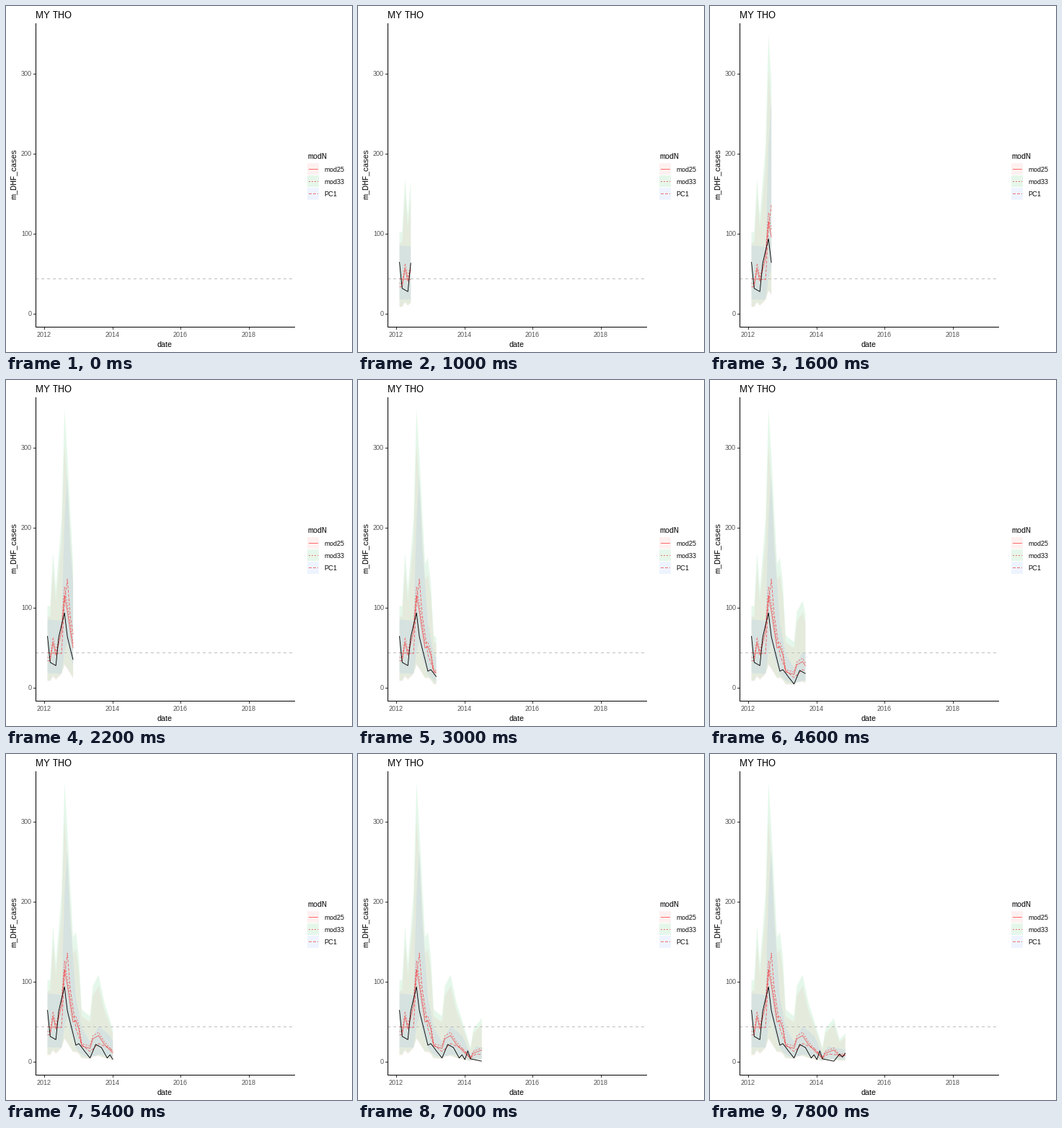
Recreate the animation shown at these times as a matplotlib script. Size 480x480 px, loop 8 s.

```python
import numpy as np
import matplotlib.pyplot as plt
from matplotlib.animation import FuncAnimation
from matplotlib.patches import Polygon, Rectangle

plt.rcParams.update({"font.family": "Liberation Sans", "lines.scale_dashes": False,
                     "text.hinting": "default", "text.hinting_factor": 1})

SIZE, FRAMES, STEP_MS = 480, 40, 200
LEFT, RIGHT, TOP, BOTTOM = 41, 401, 24, 445
RED_ALPHA, FILL_ALPHA = 0.55, 0.1
FILLS = ["#F8766D", "#00BA38", "#619CFF"]
DASHES = ["-", (0, (2, 2)), (0, (4, 2))]
NAMES = ["mod25", "mod33", "PC1"]
START = np.datetime64("2012-01-01")

dates = np.arange("2012-02", "2014-12", dtype="datetime64[M]").astype("datetime64[D]")
days = (dates - START).astype(float)
months = np.arange(len(days))
# each month lands on a whole frame of the 100-frame reveal
keys = np.round(99 * (days - days[0]) / 2526)


def through(*points):
    """Monthly series running straight between (month, value) points."""
    return np.interp(months, *zip(*points))


cases = through((0, 65), (1, 32), (3, 28), (4, 64), (6, 94), (7, 64), (10, 21),
                (11, 23), (15, 5), (17, 22), (19, 18), (21, 5), (22, 9), (23, 3),
                (24, 14), (25, 4), (29, 1), (31, 10), (32, 6), (33, 11))
mod25 = through((0, 34), (1, 34), (2, 57), (3, 41), (5, 70), (6, 116), (7, 96),
                (9, 50), (10, 52), (11, 42), (12, 20), (15, 17), (16, 29), (18, 33),
                (20, 22), (25, 4), (26, 11), (29, 15), (31, 7), (33, 9))
pc1 = through((0, 44), (5, 43), (6, 107), (7, 136), (8, 92), (10, 42), (12, 22),
              (15, 13), (18, 23), (22, 17), (25, 5), (27, 10), (33, 8))
mod33 = 1.08 * mod25 + 1.5
lines = [mod25, mod33, pc1]

# ribbons keep a nearly fixed ratio to their fitted line
top33 = (2.67 + 0.015 * months) * mod33
top25 = 0.87 * top33
bands = [(0.65 * mod25 ** 2 / top25, top25),
         (0.65 * mod33 ** 2 / top33, top33),
         (0.42 * pc1, 1.95 * pc1)]


def px(day):
    return 53.5 + 0.1297 * np.asarray(day)


def py(value):
    return 427.3 - 1.11 * np.asarray(value)


fig = plt.figure(figsize=(SIZE / 72, SIZE / 72), dpi=72, facecolor="white")
ax = fig.add_axes([0, 0, 1, 1])
ax.set_xlim(0, SIZE)
ax.set_ylim(SIZE, 0)
ax.axis("off")


def stroke(x, y, color="black", ls="-", alpha=1, lw=1, z=3):
    line, = ax.plot(x, y, color=color, ls=ls, lw=lw, alpha=alpha, zorder=z,
                    snap=False, dash_capstyle="butt", solid_capstyle="butt",
                    solid_joinstyle="round")
    return line


def label(x, y, text, size, color="black", ha="left"):
    ax.text(x, y, text, fontsize=size, color=color, ha=ha, va="baseline")


# axes
stroke([LEFT + 0.5] * 2, [TOP, BOTTOM + 1])
stroke([LEFT, RIGHT], [BOTTOM + 0.5] * 2)
for v in range(0, 301, 100):
    y = np.floor(py(v)) + 0.5
    stroke([LEFT - 3, LEFT], [y, y], "#333333")
    label(36, y + 2.5, str(v), 9, "#4D4D4D", "right")
for year in range(2012, 2019, 2):
    day = (np.datetime64(f"{year}-01-01") - START).astype(int)
    x = np.floor(px(day)) + 0.5
    stroke([x, x], [BOTTOM + 1, BOTTOM + 4], "#333333")
    label(x - 0.5, 459, str(year), 9, "#4D4D4D", "center")
label(41, 17, "MY THO", 13)
label(220.5, 473, "date", 11, ha="center")
ax.text(16, 232.5, "m_DHF_cases", fontsize=11, rotation=90, ha="right", va="center")
stroke([LEFT, RIGHT], [378.5] * 2, "#BEBEBE", (0, (4, 4)), z=2)

# legend
label(418, 212, "modN", 11)
for k, name in enumerate(NAMES):
    y = 217.5 + 17.28 * k
    ax.add_patch(Rectangle((417.6, y), 16.6, 16.6, fc=FILLS[k], ec="none",
                           alpha=FILL_ALPHA))
    mid = np.floor(y + 8.8) + 0.5
    stroke([420, 433], [mid, mid], "red", DASHES[k], RED_ALPHA)
    label(441, mid + 3.5, name, 9)

# moving parts
ribbons = [ax.add_patch(Polygon([[0, 0]] * 3, fc=c, ec="none", alpha=FILL_ALPHA,
                                zorder=1)) for c in FILLS]
fits = [stroke([], [], "red", d, RED_ALPHA, lw=0.9) for d in DASHES]
truth = stroke([], [], lw=0.9, z=4)


def shown(values, frame):
    """Values up to this frame, with an interpolated head."""
    return np.append(values[keys < frame], np.interp(frame, keys, values))


def draw(frame):
    x = px(shown(days, frame))
    for ribbon, (low, high) in zip(ribbons, bands):
        up, down = py(shown(high, frame)), py(shown(low, frame))
        ribbon.set_xy(np.column_stack([np.r_[x, x[::-1]], np.r_[up, down[::-1]]]))
    for curve, values in zip([*fits, truth], [*lines, cases]):
        curve.set_data(x, py(shown(values, frame)))
    parts = [*ribbons, *fits, truth]
    for part in parts:
        part.set_visible(frame > 0)
    return parts


anim = FuncAnimation(fig, draw, frames=FRAMES, interval=STEP_MS, repeat=True,
                     repeat_delay=0, blit=False)
plt.show()
```
